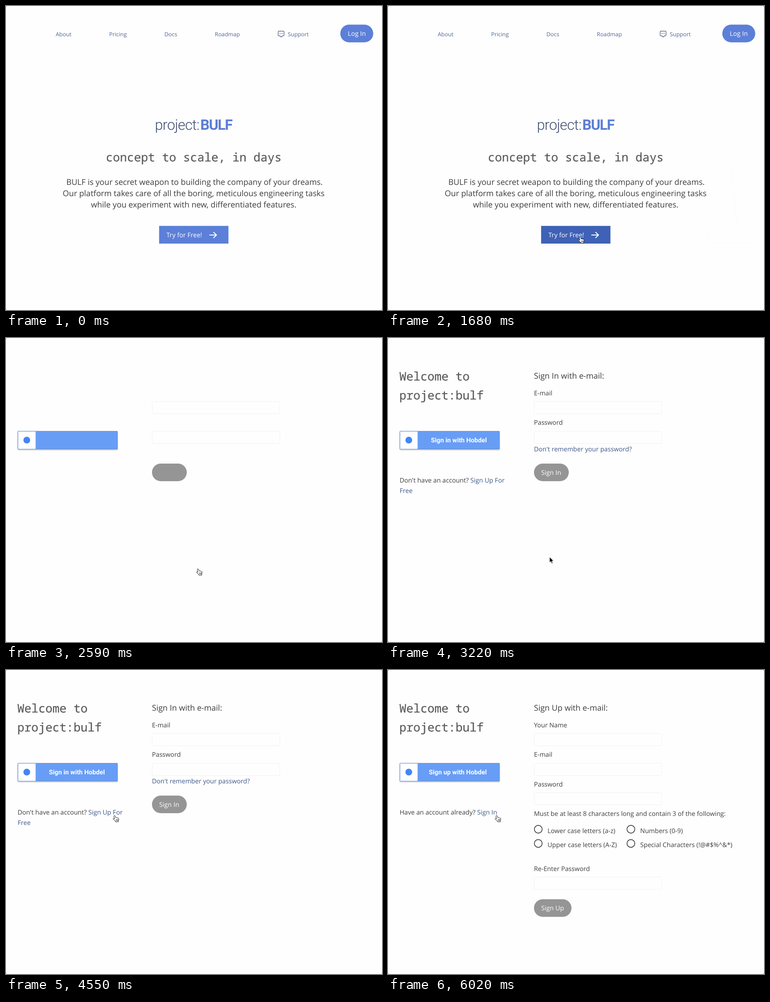
These frames come from a looping animation (832 px wide and 673 px high, 6.09 s). An HTML page:

```html
<!DOCTYPE html>
<html lang="en">
<head>
<meta charset="utf-8">
<title>Sign up walkthrough</title>
<style>
  html, body { margin: 0; width: 100%; height: 100%; overflow: hidden; background: #fefefe; }
  svg { display: block; width: 832px; height: 673px; }
  text { font: 14.15px "Open Sans", sans-serif; fill: #3d3d3d; text-rendering: geometricPrecision; white-space: pre; }
  .nav text { font-size: 12.38px; fill: #506796; }
  .big { font-size: 17.7px; }
  .mono { font: 500 26px "Noto Sans Mono", monospace; letter-spacing: -.05px; fill: #5c5c5c; stroke: #5c5c5c; stroke-width: .3px; }
  .logo { font: 300 32px Roboto, sans-serif; letter-spacing: -.65px; fill: #3f4b72; }
  .logo .name { font-weight: 700; letter-spacing: -1.5px; fill: #5c7dd6; }
  .on, .nav .on { fill: #fff; font-size: 14.15px; }
  .home .on { font-weight: 500; }
  .sso { font: 700 14.15px Roboto, sans-serif; letter-spacing: .05px; fill: #fff; }
  .link { fill: #3f5888; }
  .mid { text-anchor: middle; }
  .blue { fill: #5c7fd8; }
  .grey { fill: #959595; }
  .box { fill: #fefefe; stroke: #f1f1f1; }
  .radio { fill: none; stroke: #3a3a3a; stroke-width: 1.6; }
  .faint { fill: none; stroke: #f7fcfc; }

  /* 87 ticks of 70 ms */
  .home, .auth, .ink, .in, .up, .cta, .dash, .sketch, .cursor, .arrow, .hand { animation: 6090ms step-end infinite; }
  .home { animation-name: home; }
  .auth { animation-name: auth; }
  .ink { animation-name: ink; }
  .in { animation-name: in; }
  .up { animation-name: up; }
  .cta { animation-name: cta; }
  .dash { animation-name: dash; }
  .sketch { animation-name: sketch; }
  .cursor { animation-name: move; }
  .arrow { animation-name: arrow; }
  .hand { animation-name: hand; }

  @keyframes home { 0% { opacity: 1 } 41.379%, 100% { opacity: 0 } }
  @keyframes auth { 0% { opacity: 0 } 41.379%, 100% { opacity: 1 } }
  @keyframes ink { 0% { opacity: 0 } 43.678%, 100% { opacity: 1 } }
  @keyframes in { 0% { opacity: 1 } 86.206%, 100% { opacity: 0 } }
  @keyframes up { 0% { opacity: 0 } 86.206%, 100% { opacity: 1 } }
  @keyframes cta { 0% { fill: #5c7fd8 } 18.390% { fill: #4e71c7 } 19.540%, 100% { fill: #3f62b6 } }
  @keyframes dash { 0% { opacity: 1 } 2.298%, 100% { opacity: 0 } }
  @keyframes sketch { 0% { opacity: 0 } 2.298%, 100% { opacity: 1 } }
  @keyframes arrow {
    0% { opacity: 0 } 14.942% { opacity: 1 } 19.540% { opacity: 0 }
    44.827% { opacity: 1 } 66.666%, 100% { opacity: 0 }
  }
  @keyframes hand {
    0% { opacity: 0 } 19.540% { opacity: 1 } 44.827% { opacity: 0 } 66.666%, 100% { opacity: 1 }
  }
  @keyframes move {
    0%, 14.942% { transform: translate(405px, 656px) }
    16.091% { transform: translate(411px, 598px) }
    17.241% { transform: translate(417px, 548px) }
    18.390% { transform: translate(422px, 521px) }
    19.540% { transform: translate(425px, 511px) }
    49.425% { transform: translate(425px, 511px); animation-timing-function: steps(4) }
    54.022% { transform: translate(335px, 476px); animation-timing-function: steps(3) }
    57.471% { transform: translate(274px, 386px); animation-timing-function: steps(2) }
    59.770% { transform: translate(248px, 337px); animation-timing-function: steps(3) }
    63.218% { transform: translate(241px, 324px) }
    66.666%, 100% { transform: translate(240.5px, 322px) }
  }
</style>
</head>
<body>
<svg viewBox="0 0 832 673">
  <defs>
    <rect id="field" class="box" x="323.5" y=".5" width="282.5" height="27" rx="3"/>
    <circle id="radio" class="radio" r="8.6"/>
    <filter id="drop" x="-10%" y="-20%" width="120%" height="150%">
      <feDropShadow dx="0" dy="2" stdDeviation="1.2" flood-opacity=".3"/>
    </filter>
  </defs>
  <rect width="832" height="673" fill="#777"/>
  <rect width="832" height="673" rx="2" fill="#fefefe"/>

  <g class="home">
    <g class="nav">
      <text x="110" y="66.5">About</text>
      <text x="228.2" y="66.5">Pricing</text>
      <text x="350.6" y="66.5">Docs</text>
      <text x="462" y="66.5">Roadmap</text>
      <text x="623.5" y="66.5">Support</text>
      <path d="M604 55.6h9.5a1.8 1.8 0 0 1 1.8 1.8v7a1.8 1.8 0 0 1-1.8 1.8h-2.2l-2.5 2.4-2.5-2.4h-2.3a1.8 1.8 0 0 1-1.8-1.8v-7a1.8 1.8 0 0 1 1.8-1.8z" fill="none" stroke="#42557f" stroke-width="1.2"/>
      <path d="M605.2 61h1.4m1.6 0h1.4m1.6 0h1.4" stroke="#42557f" stroke-width="1.4"/>
      <rect class="blue" x="739.7" y="41.3" width="72.9" height="39.3" rx="19.6"/>
      <text class="on" x="756.3" y="66.3">Log In</text>
    </g>
    <text class="logo" x="329.5" y="274">project:</text>
    <text class="logo" x="430" y="274"><tspan class="name">BULF</tspan></text>
    <text class="mono" x="221" y="343.5">concept to scale, in days</text>
    <text class="big" x="700.8" y="396" text-anchor="end">BULF is your secret weapon to building the company of your dreams.</text>
    <text class="big mid" x="415.3" y="421">Our platform takes care of all the boring, meticulous engineering tasks</text>
    <text class="big mid" x="415.3" y="446">while you experiment with new, differentiated features.</text>
    <rect class="cta" x="338.8" y="486.8" width="153.4" height="39.2"/>
    <text class="on" x="355" y="512">Try for Free!</text>
    <path d="M450 507h16m-7-6.5l6.7 6.5-6.7 6.5" fill="none" stroke="#fff" stroke-width="2"/>
    <path class="faint dash" d="M715 489h5m16 0h14m16 0h12m14 0h16"/>
    <path class="faint sketch" d="M728 343.5h19M758 362q11 40 13 126M808 489h-88q-12 6-12 17t14 17h86"/>
  </g>

  <g class="auth">
    <rect x="26" y="206" width="221" height="40" rx="1" fill="#679df6" filter="url(#drop)"/>
    <rect x="26.3" y="206.3" width="220.4" height="39.4" rx="1" fill="none" stroke="#5f86bd" stroke-width=".7"/>
    <rect x="27" y="207" width="38.5" height="38.5" fill="#fff"/>
    <circle cx="46" cy="226" r="7.5" fill="#4285f4"/>
    <use href="#field" y="140"/>
    <use href="#field" y="206"/>

    <g class="ink">
      <text class="mono" x="25" y="94">Welcome to</text>
      <text class="mono" x="25" y="136">project:bulf</text>
    </g>

    <g class="in">
      <rect class="grey" x="323" y="278" width="77" height="39" rx="19.5"/>
      <g class="ink">
        <text class="sso" x="95" y="230.5">Sign in with Hobdel</text>
        <text x="25.7" y="319.5">Don't have an account? <tspan class="link">Sign Up For</tspan></text>
        <text class="link" x="25.7" y="342.5">Free</text>
        <text class="big" x="323" y="89.5">Sign In with e-mail:</text>
        <text x="323" y="126.5">E-mail</text>
        <text x="323" y="192">Password</text>
        <text class="link" x="323" y="250.5">Don't remember your password?</text>
        <text class="on" x="339" y="303">Sign In</text>
      </g>
    </g>

    <g class="up">
      <text class="sso" x="90.5" y="230.5">Sign up with Hobdel</text>
      <text x="25.7" y="319.5">Have an account already? <tspan class="link">Sign In</tspan></text>
      <text class="big" x="323" y="89.5">Sign Up with e-mail:</text>
      <text x="323" y="126.5">Your Name</text>
      <text x="323" y="192">E-mail</text>
      <text x="323" y="257.5">Password</text>
      <use href="#field" y="271"/>
      <text x="323" y="323">Must be at least 8 characters long and contain 3 of the following:</text>
      <use href="#radio" x="332.5" y="352.5"/>
      <use href="#radio" x="332.5" y="384"/>
      <use href="#radio" x="537.5" y="352.5"/>
      <use href="#radio" x="537.5" y="384"/>
      <text x="353" y="361">Lower case letters (a-z)</text>
      <text x="353" y="392">Upper case letters (A-Z)</text>
      <text x="558" y="361">Numbers (0-9)</text>
      <text x="558" y="392">Special Characters (!@#$%^&amp;*)</text>
      <text x="323" y="444.5">Re-Enter Password</text>
      <use href="#field" y="458"/>
      <rect class="grey" x="323" y="507.5" width="83" height="39" rx="19.5"/>
      <text class="on" x="339" y="532">Sign Up</text>
    </g>
  </g>

  <g class="cursor">
    <path class="arrow" d="M0 0v12.5l2.9-2.6 2 4.6 2.2-.9-2-4.5h4z" fill="#000" stroke="#fff" stroke-width=".9"/>
    <g class="hand" stroke-linejoin="round" stroke-linecap="round">
      <path d="M-1.2 .8c.9-1.2 2-.6 2.4.5l1.3 3.6c.7-.8 1.9-.6 2.2.3.8-.6 1.9-.3 2.1.5.9-.4 1.9.2 2 1.3.2 2.3-.1 3.4-.8 4.7v2.3h-6.2l-.4-1.5-4.5-4.2c-.9-1 .2-2.2 1.4-1.5l1.3.9-1.2-4.7c-.2-.8-.1-1.6.4-2.2z" fill="#fff" stroke="#111"/>
      <path d="M3.2 8.5v3.2m2-3.2v3.2m2-3.2v3.2" stroke="#111" stroke-width=".8"/>
    </g>
  </g>
</svg>
</body>
</html>
```
